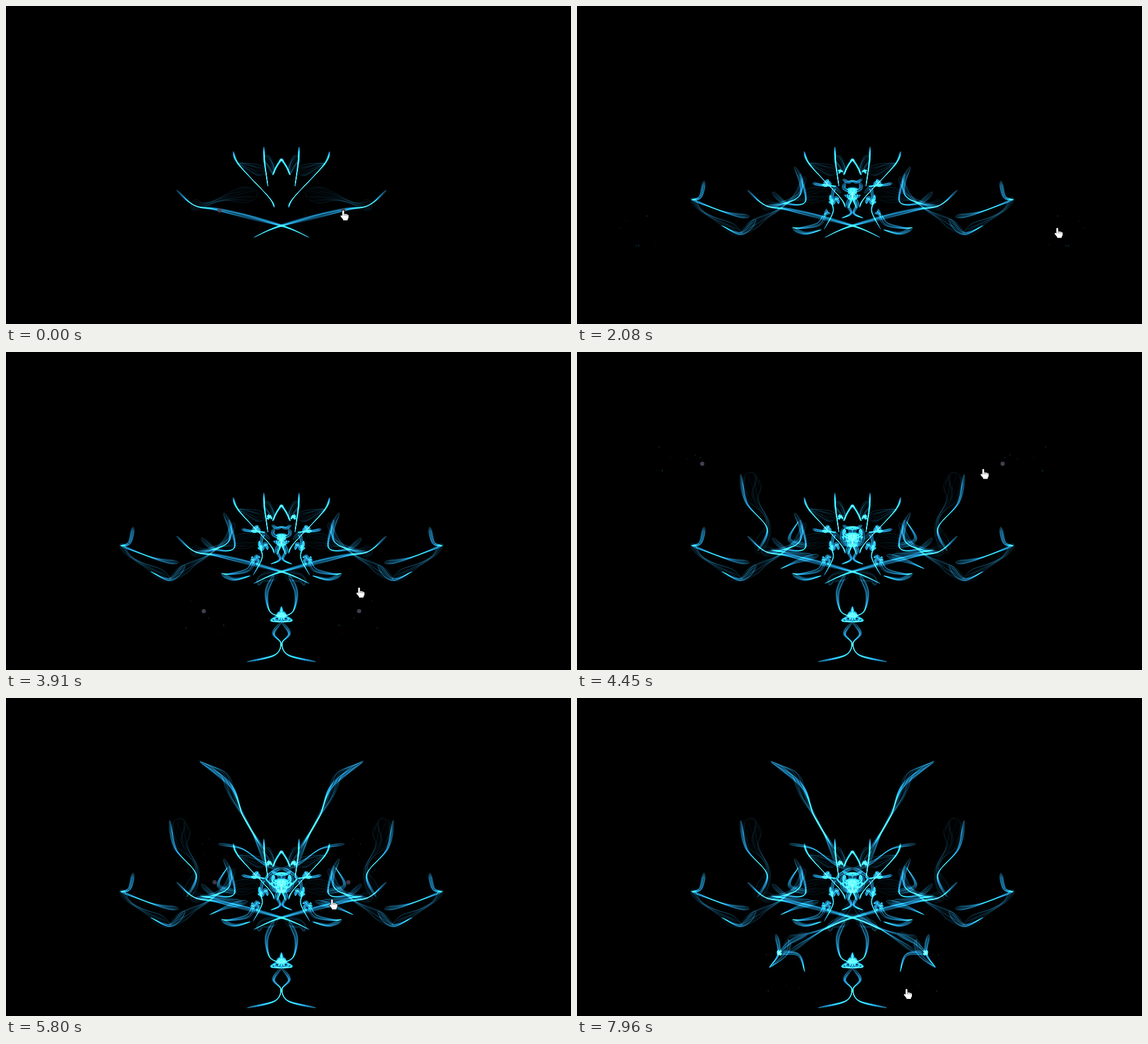
Write an HTML page with a canvas that moves like this. It is 960x540 px and loops after 8000 ms.

```html
<!DOCTYPE html>
<html lang="en">
<head>
<meta charset="utf-8">
<title>Mirrored smoke drawing</title>
<style>
  html, body { margin: 0; width: 100%; height: 100%; overflow: hidden; background: #000; }
  canvas { display: block; width: 960px; height: 540px; }
</style>
</head>
<body>
<canvas id="stage" width="960" height="540"></canvas>
<script>
const W = 960, H = 540, AXIS = 468, LOOP = 8000;
const STEPS = 8, PAUSE = 150, DOT_LAG = 90, THREADS = 13;
const stage = document.getElementById('stage').getContext('2d');
const half = document.createElement('canvas');
half.width = W;
half.height = H;
const ink = half.getContext('2d');

const clamp = (v, lo = 0, hi = 1) => Math.max(lo, Math.min(hi, v));

function seeded(seed) {
  return () => {
    seed = (seed * 16807 + 11) % 2147483647;
    return seed / 2147483647;
  };
}

const parse = text => text.split(' ').map(p => p.split(',').map(Number));

// Point at s (0..1) on a Catmull-Rom curve
function along(pts, s) {
  const last = pts.length - 1, k = Math.min(last - 1, Math.floor(s * last)), t = s * last - k;
  const [a, b, c, d] = [-1, 0, 1, 2].map(i => pts[clamp(k + i, 0, last)]);
  return [0, 1].map(j => b[j] + t * (c[j] - a[j]
    + t * (2 * a[j] - 5 * b[j] + 4 * c[j] - d[j] + t * (3 * (b[j] - c[j]) + d[j] - a[j]))) / 2);
}

const bursts = [];
function burst(start, path, dot = 0) {
  bursts.push({ start, path: parse(path), dot, strokes: [] });
}

// A ribbon of smoke: wide ones are faint, long ones fold more often
function smoke(width, pts) {
  if (typeof pts === 'string') pts = parse(pts);
  const { strokes } = bursts[bursts.length - 1];
  const rand = seeded(width * 977 + pts[0][0] * 31 + strokes.length * 613);
  let length = 0;
  pts.forEach((p, i) => { if (i) length += Math.hypot(p[0] - pts[i - 1][0], p[1] - pts[i - 1][1]); });
  const count = Math.max(8, Math.round(length / 3)), turn = length / 75 * Math.PI, phase = rand() * 2;
  const line = [];
  for (let i = 0; i <= count; i++) {
    const s = i / count;
    const [x, y] = along(pts, s);
    const [x0, y0] = along(pts, Math.max(0, s - .01)), [x1, y1] = along(pts, Math.min(1, s + .01));
    const len = Math.hypot(x1 - x0, y1 - y0) || 1;
    const w = width * Math.sqrt(Math.min(1, 5 * s, 5 * (1 - s))) * (.55 + .45 * Math.cos(turn * s + phase));
    line.push({ x, y, w, nx: (y0 - y1) / len, ny: (x1 - x0) / len });
  }
  const threads = Array.from({ length: THREADS }, (_, k) => ({
    u: Math.sin((k / (THREADS - 1) - .5) * Math.PI),
    phase: rand() * 6.3,
    alpha: .62 / (1 + width * .2) * (.4 + rand())
  }));
  strokes.push({ line, threads });
}

// A small bright knot with short bent arms
function knot(x, y, size) {
  const rand = seeded(x * 53 + y * 17);
  for (let i = 0; i < 4; i++) {
    const a = i * 1.57 + rand(), b = a + .9, r = size * (.6 + rand() * .6);
    smoke(size / 5, [[x, y], [x + r * .6 * Math.cos(b), y + r * .6 * Math.sin(b)],
      [x + r * Math.cos(a), y + r * Math.sin(a)]]);
  }
}

// Opening figure
burst(-2000, '573,347 573,347', 1);
smoke(2.6, '646,313 615,339 570,347 468,373 421,393');
smoke(18, '508,318 560,325 600,338 622,337');
smoke(1.6, '550,247 540,270 490,324 480,342');
smoke(10, '497,284 525,273 543,268');
smoke(1.2, '498,239 497,262 494,285 491,306');
smoke(7, '497,255 487,268 481,286');
smoke(1.2, '465,264 468,261 476,272 483,287');

// Inner wings and face
burst(400, '573,347 560,300 665,379 755,374');
smoke(8, '548,290 562,318 592,345 625,364 657,386');
smoke(5, '566,273 556,296 558,322 584,336 615,340');
smoke(5, '604,316 580,335 548,332 557,285');
smoke(4, '488,318 499,309 503,332 501,350 516,379');
smoke(2, '485,294 476,299 468,297');
smoke(3, '480,299 482,310 468,320 475,343');
knot(468, 318, 13);
knot(498, 330, 10);

// Outer wings and ornaments
burst(1540, '790,320 842,390 700,320 540,370');
smoke(12, '657,387 690,368 725,347 742,326');
smoke(5, '643,358 685,350 742,328');
smoke(5, '632,362 657,386 690,373');
smoke(3, '720,297 726,324 741,329');
smoke(2, '536,301 520,304 496,306');
smoke(4, '515,352 525,370 555,377 570,376');
smoke(3, '570,377 548,386 521,380');
smoke(3, '468,322 476,336 470,352 486,360');
knot(511, 301, 9);
knot(489, 281, 5);
knot(513, 351, 10);

// Stem and foot
burst(2680, '520,385 461,495 500,515 600,440');
smoke(4, '481,379 493,408 488,440 468,450');
smoke(9, '474,378 500,384 507,396');
smoke(2, '468,432 471,446 486,456 468,458');
knot(469, 450, 11);
smoke(3, '468,458 481,478 469,495 480,515 526,526');

// Raised wings
burst(3790, '600,400 785,215 706,193 590,260', .9);
smoke(18, '630,342 612,290 638,245 640,204');
smoke(3, '629,338 613,300 648,256 658,208');
smoke(6, '535,347 565,343 606,336');
smoke(5, '525,345 560,355 590,368');
smoke(5, '545,330 575,318 560,288');
smoke(3, '485,299 484,324 468,330');
knot(470, 310, 15);

// Antennae
burst(4840, '590,300 615,90 660,210 554,342', .8);
smoke(6, '491,290 515,232 548,172 567,130 607,107');
smoke(2.5, '498,257 532,203 553,150 606,109');
smoke(5, '468,292 500,280 535,256 575,248');
smoke(3, '468,288 494,306 468,330');

// Rear legs
burst(5920, '530,370 590,440 640,490 707,500', .15);
smoke(9, '466,344 500,384 555,404 578,411');
smoke(6, '577,410 583,436 609,458');
smoke(6, '468,368 515,392 576,432');

// Feet
burst(7030, '690,460 610,410 590,440 560,494');
smoke(3, '598,401 593,433 609,457');
smoke(4, '594,433 560,436 549,465');
smoke(6, '545,400 575,415 593,433');
knot(592, 433, 5);

bursts.forEach((b, i) => {
  const next = i + 1 < bursts.length ? bursts[i + 1].start : LOOP + 110;
  b.length = next - b.start - PAUSE;
});

const steps = [0];
for (const b of bursts.slice(1))
  for (let i = 0; i < STEPS; i++) steps.push(b.start + b.length * i / (STEPS - 1));

const burstAt = time => bursts.filter(b => b.start <= time + .5).pop();

function pointerAt(time) {
  const b = burstAt(time);
  return along(b.path, clamp((time - b.start) / b.length));
}

// Strokes of a burst begin one after another and overlap
function drawBurst({ start, length, strokes }, time) {
  const s = (time - start) / length;
  strokes.forEach((stroke, i) => drawStroke(stroke, clamp(s / .3 - i / strokes.length)));
}

function drawStroke({ line, threads }, progress) {
  const last = line.length - 1, end = Math.floor(last * progress);
  for (const { u, phase, alpha } of threads) {
    const place = i => {
      const p = line[i], off = p.w * (u + .25 * Math.sin(i * .3 + phase));
      return [p.x + p.nx * off, p.y + p.ny * off];
    };
    for (let i = 0; i < end; i++) {
      const s = i / last;
      ink.globalAlpha = Math.min(1, alpha * Math.min(1, .2 + s * 5, .15 + (1 - s) * 5));
      ink.beginPath();
      ink.moveTo(...place(i));
      ink.lineTo(...place(i + 1));
      ink.stroke();
    }
  }
}

function disc(ctx, x, y, r, colour) {
  ctx.fillStyle = colour;
  ctx.beginPath();
  ctx.arc(x, y, r, 0, Math.PI * 2);
  ctx.fill();
}

function drawSparks(time, index) {
  if (!index) return;
  const rand = seeded(index * 7919 + 5), [x, y] = pointerAt(time - 2 * DOT_LAG);
  for (let i = 0; i < 6; i++) {
    ink.globalAlpha = .2 + rand() * .4;
    disc(ink, x + (rand() - .5) * 80, y + (rand() - .5) * 70, .6 + rand() * .4, '#1a83b0');
  }
}

function mirrored(draw) {
  draw();
  stage.save();
  stage.translate(AXIS * 2, 0);
  stage.scale(-1, 1);
  draw();
  stage.restore();
}

const hand = new Path2D('M-1.6 1Q0-.8 1.4 1V6.2Q2.8 5 4 6.6Q5.6 5.6 6.7 7.3Q8.8 6.6 9 8.8V12Q8.8 14 7.4 15.2V17H-.2V15.6L-4.2 10.8Q-5.2 9-3.5 8.6Q-2.5 8.6-1.6 10Z');
const fingers = new Path2D('M1.4 6V9.2M4 6.8V9.4M6.7 7.5V9.6');

function drawHand(time) {
  stage.save();
  stage.translate(...pointerAt(time));
  stage.lineWidth = 1.6;
  stage.strokeStyle = '#000';
  stage.stroke(hand);
  stage.fillStyle = '#fff';
  stage.fill(hand);
  stage.lineWidth = .6;
  stage.stroke(fingers);
  stage.restore();
}

function render(index) {
  const time = steps[index];
  ink.globalCompositeOperation = 'source-over';
  ink.globalAlpha = 1;
  ink.fillStyle = '#000';
  ink.fillRect(0, 0, W, H);
  ink.globalCompositeOperation = 'lighter';
  ink.strokeStyle = 'rgb(32,160,222)';
  ink.lineWidth = .75;
  for (const b of bursts) drawBurst(b, time);
  drawSparks(time, index);

  stage.globalCompositeOperation = 'source-over';
  stage.fillStyle = '#000';
  stage.fillRect(0, 0, W, H);
  stage.globalCompositeOperation = 'lighter';
  mirrored(() => stage.drawImage(half, 0, 0));
  stage.filter = 'blur(2px)';
  stage.globalAlpha = .22;
  mirrored(() => stage.drawImage(half, 0, 0));
  stage.filter = 'none';
  stage.globalCompositeOperation = 'source-over';
  stage.globalAlpha = burstAt(time).dot;
  mirrored(() => disc(stage, ...pointerAt(time - DOT_LAG), 3.6, '#4d4458'));
  stage.globalAlpha = 1;
  drawHand(time);
}

const start = performance.now();
let shown = -1;
function tick() {
  const time = (performance.now() - start) % LOOP;
  let index = steps.length - 1;
  while (steps[index] > time + .5) index--;
  if (index !== shown) render(shown = index);
  requestAnimationFrame(tick);
}
tick();
</script>
</body>
</html>
```
